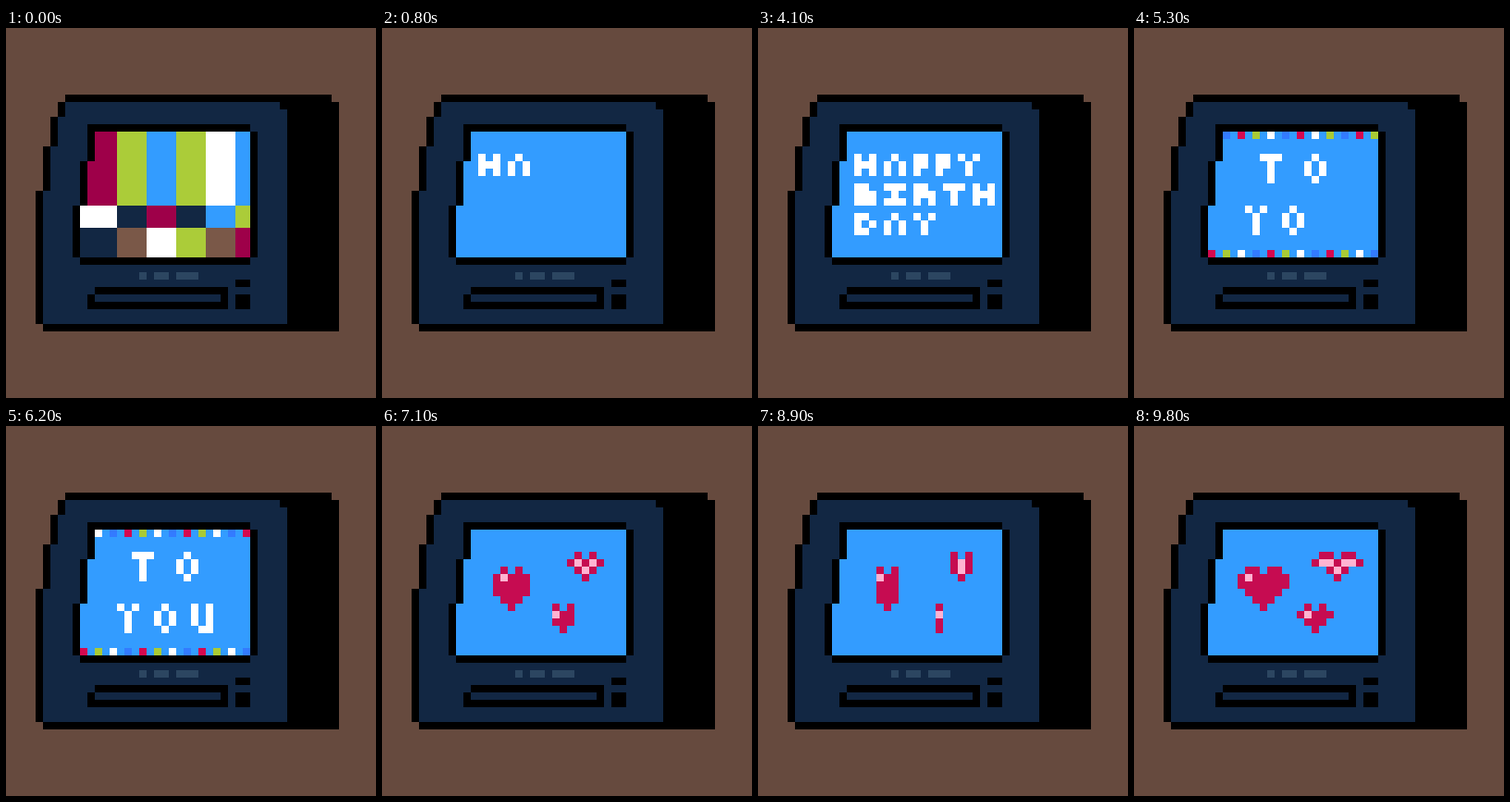
An HTML page with a canvas for the animation above (9.95 s loop, 400 px wide and 400 px high).

```html
<!DOCTYPE html>
<html lang="en">
<head>
<meta charset="utf-8">
<title>Birthday television</title>
<style>
  html, body { margin: 0; width: 100%; height: 100%; overflow: hidden; background: #664a3e; }
  canvas { display: block; width: 400px; height: 400px; }
</style>
</head>
<body>
<canvas id="stage" width="400" height="400" role="img" aria-label="Happy birthday to you"></canvas>
<script>
const ctx = document.getElementById("stage").getContext("2d");
ctx.scale(8, 8); // one unit is one art pixel

const LOOP = 9950, HOLD = 500, STEP = 300;
const WALL = "#664a3e", NAVY = "#122743", BLACK = "#000", LABEL = "#2c4661";
const SKY = "#339cff", WHITE = "#fff", LIME = "#abcc39", WINE = "#9e0049", BROWN = "#7a5848";
const INK = { X: WHITE };
const HEART = { X: "#c60c51", p: "#ffb3d1" };
const LIGHT = { R: "#d5084f", G: "#a9cb35", W: WHITE, B: "#337bff" };

const GLYPHS = {
  H: "X.X/XXX/X.X", A: ".X./X.X/X.X", P: "XX/XX/X", Y: "X.X/.X./.X.",
  B: "XX./XXX/XXX", I: "XXX/.X./XXX", R: "XX./XXX/X.X", T: "XXX/.X./.X.", D: "XX./X.X/XX."
};
const TALL = {
  T: "XXX/.X./.X./.X.", O: ".X./X.X/X.X/.X.", Y: "X.X/X.X/.X./.X.", U: "X.X/X.X/X.X/.XX"
};
TALL.Y = "X.X/.X./.X./.X.";

// Each heart: centre column, top row, then shapes from full face to side view.
const HEARTS = [
  [17, 19, [
    ".XX.XX./XpXXXXX/XXXXXXX/.XXXXX./..XXX../...X...",
    ".X.X./XpXXX/XXXXX/XXXXX/.XXX./..X..",
    "X.X/pXX/XXX/XXX/XXX/.X."]],
  [27, 17, [
    ".XX.XX./XppXppX/..XpX../...X...",
    ".X.X./XpXpX/.XpX./..X..",
    "X.X/XpX/XpX/.X."]],
  [24, 24, [
    ".X.X./XpXXX/.XXX./..X..",
    "X.X/pXX/XXX/.X.",
    "X/p/X/X"]]
];
const SPIN = [1, 0, 1, 2, 2];
const CHASE = ["BRGWBRWGBRG", "RGWBRGWBRGW", "GWBRGWBRGWB", "WBRGWBRGWBR"];

function box(color, x, y, w, h) {
  ctx.fillStyle = color;
  ctx.fillRect(x, y, w, h);
}

function sprite(art, x, y, colors, mirror) {
  art.split("/").forEach((row, j) => {
    const cells = mirror ? [...row].reverse() : [...row];
    cells.forEach((c, i) => colors[c] && box(colors[c], x + i, y + j, 1, 1));
  });
}

function screenRows(color) {
  box(color, 12, 14, 21, 4);
  box(color, 11, 18, 22, 6);
  box(color, 10, 24, 23, 7);
}

function television() {
  box(WALL, 0, 0, 50, 50);
  box(BLACK, 8, 9, 36, 1);
  box(BLACK, 7, 10, 38, 2);
  box(BLACK, 6, 12, 39, 4);
  box(BLACK, 5, 16, 40, 6);
  box(BLACK, 4, 22, 41, 18);
  box(BLACK, 5, 40, 40, 1);

  box(NAVY, 8, 10, 29, 1);
  box(NAVY, 8, 11, 30, 1);
  box(NAVY, 7, 12, 31, 4);
  box(NAVY, 6, 16, 32, 6);
  box(NAVY, 5, 22, 33, 18);

  box(BLACK, 11, 13, 22, 5);
  box(BLACK, 10, 18, 23, 6);
  box(BLACK, 9, 24, 24, 7);
  box(BLACK, 33, 14, 1, 17);
  box(BLACK, 10, 31, 23, 1);

  box(LABEL, 18, 33, 1, 1);
  box(LABEL, 20, 33, 2, 1);
  box(LABEL, 23, 33, 3, 1);
  box(BLACK, 12, 35, 18, 1);
  box(BLACK, 11, 36, 19, 2);
  box(NAVY, 12, 36, 17, 1);
  box(BLACK, 31, 34, 2, 1);
  box(BLACK, 31, 36, 2, 2);
}

function bars(colors, y, h) {
  const edges = [10, 15, 19, 23, 27, 31, 33];
  colors.forEach((c, i) => box(c, edges[i], y, edges[i + 1] - edges[i], h));
}

function testCard() {
  screenRows(WINE);
  bars([WINE, LIME, SKY, LIME, WHITE, SKY].slice(0, 1), 24, 0);
  [LIME, SKY, LIME, WHITE].forEach((c, i) => box(c, 15 + i * 4, 14, 4, 10));
  box(SKY, 31, 14, 2, 10);
  bars([WHITE, NAVY, WINE, NAVY, SKY, LIME], 24, 3);
  bars([NAVY, BROWN, WHITE, LIME, BROWN, WINE], 27, 4);
}

function greeting(count) {
  ["HAPPY", "BIRTH", "DAY"].forEach((word, line) => {
    let x = 13;
    for (const letter of word) {
      if (count-- <= 0) return;
      sprite(GLYPHS[letter], x, 17 + line * 4, INK);
      x += GLYPHS[letter].indexOf("/") + 1;
    }
  });
}

function lights(pattern, x, y) {
  [...pattern].forEach((c, i) => box(LIGHT[c], x + i * 2, y, 1, 1));
}

function toYou(step) {
  lights(CHASE[(step + 1) % 4], 12, 14);
  lights("RGWBRGWBRGWB", 10, 30);
  const places = [["T", 17, 17], ["O", 23, 17], ["Y", 15, 24], ["O", 20, 24], ["U", 25, 24]];
  places.slice(0, step + 1).forEach(([c, x, y]) => sprite(TALL[c], x, y, INK));
}

function hearts(step) {
  const phase = step % SPIN.length;
  for (const [cx, y, shapes] of HEARTS) {
    const art = shapes[SPIN[phase]];
    sprite(art, cx - (art.indexOf("/") - 1) / 2, y, HEART, phase === 4);
  }
}

function draw(time) {
  const t = time % LOOP;
  const beat = t < HOLD ? 0 : 1 + Math.floor((t - HOLD) / STEP);
  television();
  if (beat === 0) return testCard();
  screenRows(SKY);
  if (beat < 14) greeting(beat);
  else if (beat < 21) toYou(beat - 14);
  else hearts(beat - 21);
}

const start = performance.now();
function tick() {
  draw(performance.now() - start);
  requestAnimationFrame(tick);
}
tick();
</script>
</body>
</html>
```
